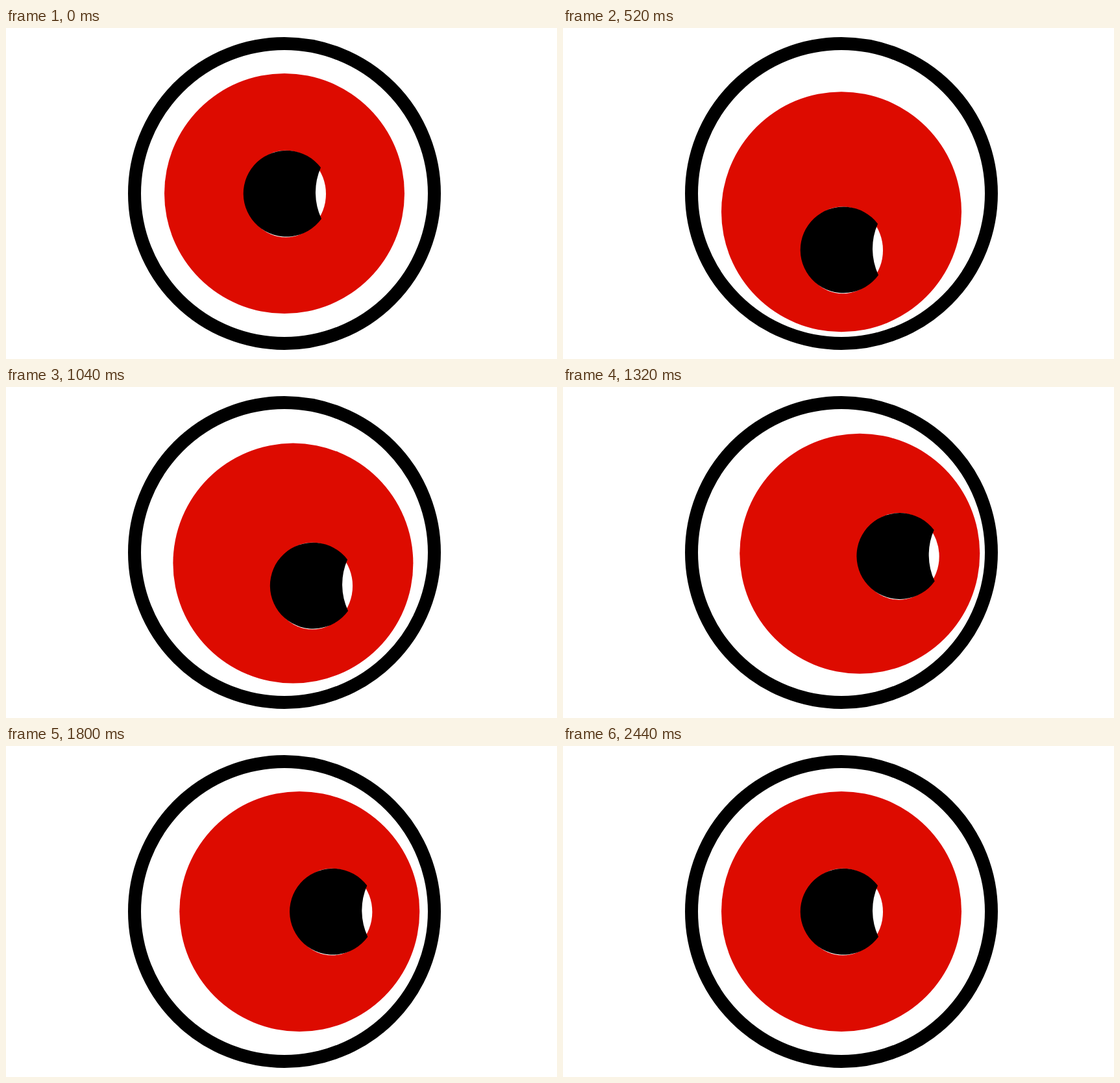
Write an HTML page that moves like this. It is 849 px wide and 510 px high and loops after 2640 ms.

```html
<!DOCTYPE html>
<html lang="en">
<head>
<meta charset="utf-8">
<title>Looking eye</title>
<style>
  html, body { margin: 0; width: 100%; height: 100%; overflow: hidden; background: #fff; }
  svg { display: block; width: 100vw; height: 100vh; }
</style>
</head>
<body>
<svg viewBox="0 0 849 510">
  <circle cx="429" cy="255" r="231" fill="#fff" stroke="#000" stroke-width="20"/>
  <circle id="iris" cx="429" cy="255" r="185" fill="#dd0b00"/>
  <g id="pupil">
    <ellipse cx="431" cy="255.7" rx="62" ry="66.9" fill="#fff"/>
    <path d="M485 215A66.4 66.4 0 1 0 486 294A96 96 0 0 1 485 215Z"/>
  </g>
</svg>
<script>
  const LOOP = 2640, LEG = 800, STEP = 40;
  const IRIS = 30, PUPIL = 92;
  // Gaze directions: centre, down, right, centre
  const gaze = [[0, 0], [0, 1], [1, 0], [0, 0]];
  const iris = document.getElementById('iris');
  const pupil = document.getElementById('pupil');

  // cubic-bezier(.5, 0, 0, 1), solved by bisection
  function ease(x) {
    if (x <= 0 || x >= 1) return x <= 0 ? 0 : 1;
    let lo = 0, hi = 1;
    for (let i = 0; i < 30; i++) {
      const s = (lo + hi) / 2;
      if (1.5 * s * (1 - s) ** 2 + s ** 3 < x) lo = s; else hi = s;
    }
    return lo * lo * (3 - 2 * lo);
  }

  function shift(el, x, y, reach) {
    el.setAttribute('transform', `translate(${x * reach} ${y * reach})`);
  }

  function draw(ms) {
    const t = Math.floor((ms % LOOP) / STEP) * STEP;
    const leg = Math.min(Math.floor(t / LEG), 2);
    const k = ease(t / LEG - leg);
    const [x, y] = gaze[leg].map((v, i) => v + (gaze[leg + 1][i] - v) * k);
    shift(iris, x, y, IRIS);
    shift(pupil, x, y, PUPIL);
  }

  const start = performance.now();
  function tick() {
    draw(performance.now() - start);
    requestAnimationFrame(tick);
  }
  tick();
</script>
</body>
</html>
```
